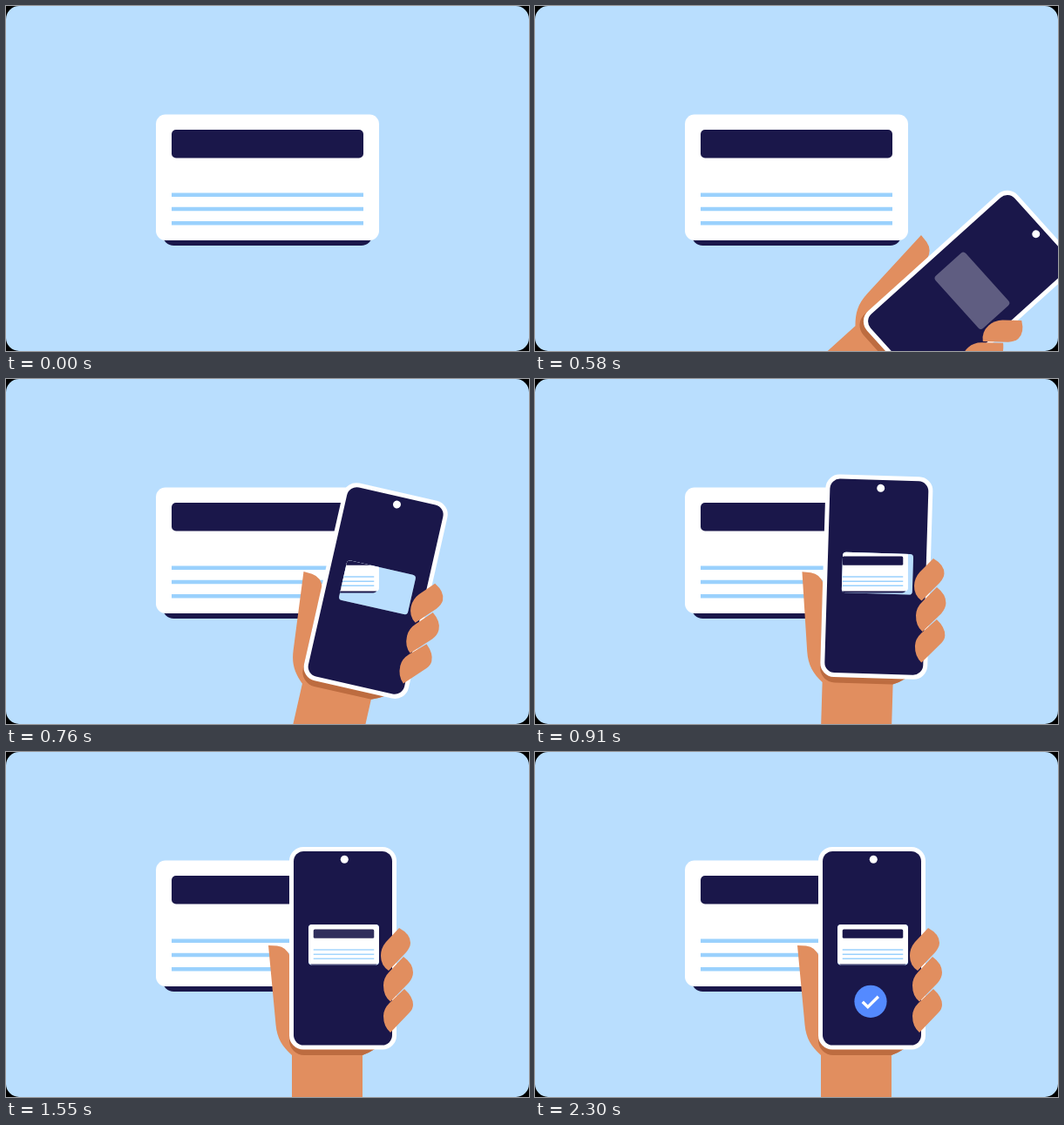
An HTML page with a canvas for the animation above (3.06 s loop, 600 px wide and 396 px high).

```html
<!DOCTYPE html>
<html lang="en">
<head>
<meta charset="utf-8">
<title>Card scan</title>
<style>
  html, body { margin: 0; width: 100%; height: 100%; overflow: hidden; background: #000; }
  canvas { display: block; width: 100vw; height: 100vh; }
</style>
</head>
<body>
<canvas id="stage"></canvas>
<script>
const W = 600, H = 396, LOOP = 3060;
const SKY = '#b9defe', NAVY = '#1a174a', LINE = '#9ad1fd', WHITE = '#fff';
const SKIN = '#e18e5f', SHADE = '#bd6c40', BLUE = '#548aff';

const canvas = document.getElementById('stage');
const ctx = canvas.getContext('2d');
const dpr = window.devicePixelRatio || 1;
canvas.width = W * dpr;
canvas.height = H * dpr;

const palm = new Path2D(
  'M301 222 L311 222.6 Q322 224 326 235 L345 250 L345 325 L430 325 L423 341 ' +
  'Q417 345 409 348 L409 430 L328 430 L328 348 C317 338 311 329 309.5 313 Z');
const fingers = [
  'M451 202 Q464 209 464 219 Q464 224 459 230 L439 251 Q430 245 430 234 Q430 225 436 218 Z',
  'M456 235 Q467 243 467 253 Q467 259 462 265 L441 286.5 Q433 280 433 268 Q433 259 440 252 Z',
  'M457 272 Q467 281 467 290 Q467 295 463 299 L441 322 Q433 315 433 303 Q433 295 440 288 Z'
].map(d => new Path2D(d));

const clamp = x => Math.min(1, Math.max(0, x));
const span = (t, a, b) => clamp((t - a) / (b - a));
const easeOut = u => 1 - (1 - u) ** 3;
const easeInOut = u => u < 0.5 ? 2 * u * u : 1 - 2 * (1 - u) ** 2;

function box(x, y, w, h, r, color) {
  ctx.beginPath();
  ctx.roundRect(x, y, w, h, r);
  ctx.fillStyle = color;
  ctx.fill();
}

function disc(x, y, r, color) {
  ctx.beginPath();
  ctx.arc(x, y, r, 0, Math.PI * 2);
  ctx.fillStyle = color;
  ctx.fill();
}

function resetView() {
  ctx.setTransform(dpr, 0, 0, dpr, 0, 0);
}

function drawScene() {
  box(0, 0, W, H, 0, SKY);
  box(179.5, 240, 241, 35, 13, NAVY);
  box(172, 124.5, 256, 144.5, 11, WHITE);
  box(190, 142, 220, 32.5, 5, NAVY);
  for (let i = 0; i < 3; i++) box(190, 214.5 + i * 16.2, 220, 4.5, 0, LINE);
}

// Degrees of swing about the wrist
function swing(t) {
  const time = t < 520 ? 450 : t;
  return 94 * (1 - span(time, 450, 1050)) ** 2.73;
}

// The scanned scene stays still while the window moves over it
function drawFinder(t) {
  ctx.save();
  box(347, 198, 81, 46.5, 4, 'rgba(255,255,255,.3)');
  ctx.clip();
  ctx.save();
  resetView();
  ctx.translate(387.5, 220.75);
  ctx.scale(0.316, 0.316);
  ctx.translate(-300, -196.75);
  drawScene();
  ctx.restore();
  const flash = span(t, 1100, 1250) * (1 - span(t, 1290, 1580));
  box(347, 198, 81, 46.5, 4, `rgba(255,255,255,${flash})`);
  ctx.restore();
}

function drawLoader(t) {
  const x = 385, y = 286.3;
  const head = easeInOut(span(t, 1550, 1872));
  const tail = easeInOut(span(t, 1640, 1922));
  ctx.strokeStyle = WHITE;
  if (head > tail) {
    const top = -Math.PI / 2, turn = Math.PI * 2;
    ctx.lineWidth = 2;
    ctx.beginPath();
    ctx.arc(x, y, 20.3, top + tail * turn, top + head * turn);
    ctx.stroke();
  }
  const grow = easeOut(span(t, 1827, 2087));
  if (grow > 0) disc(x, y, 18.6 * grow, BLUE);

  const tick = easeInOut(span(t, 2060, 2290));
  if (tick > 0) {
    const length = 25.2;
    ctx.save();
    ctx.lineWidth = 3.4;
    ctx.setLineDash([length * tick, length * 2]);
    ctx.beginPath();
    ctx.moveTo(375.8, 286.8);
    ctx.lineTo(381.8, 292.6);
    ctx.lineTo(394, 280.6);
    ctx.stroke();
    ctx.restore();
  }
}

function drawHand(t) {
  ctx.save();
  ctx.translate(326, 402);
  ctx.rotate(swing(t) * Math.PI / 180);
  ctx.translate(-326, -402);

  ctx.fillStyle = SKIN;
  ctx.fill(palm);
  ctx.save();
  ctx.clip(palm);
  box(325, 240, 123, 108, 17, SHADE);
  ctx.restore();

  box(325, 109, 123, 232.5, 16, WHITE);
  box(330, 114, 113, 222.5, 11.5, NAVY);
  disc(388.3, 123.3, 4.5, WHITE);
  drawFinder(t);
  drawLoader(t);

  ctx.fillStyle = SKIN;
  fingers.forEach(f => ctx.fill(f));
  ctx.restore();
}

function draw(t) {
  resetView();
  box(0, 0, W, H, 0, '#000');
  ctx.save();
  ctx.beginPath();
  ctx.roundRect(0, 0, W, H, 15);
  ctx.clip();
  drawScene();
  if (t >= 450) drawHand(t);
  ctx.restore();
}

const start = performance.now();
function tick() {
  draw((performance.now() - start) % LOOP);
  requestAnimationFrame(tick);
}
tick();
</script>
</body>
</html>
```
